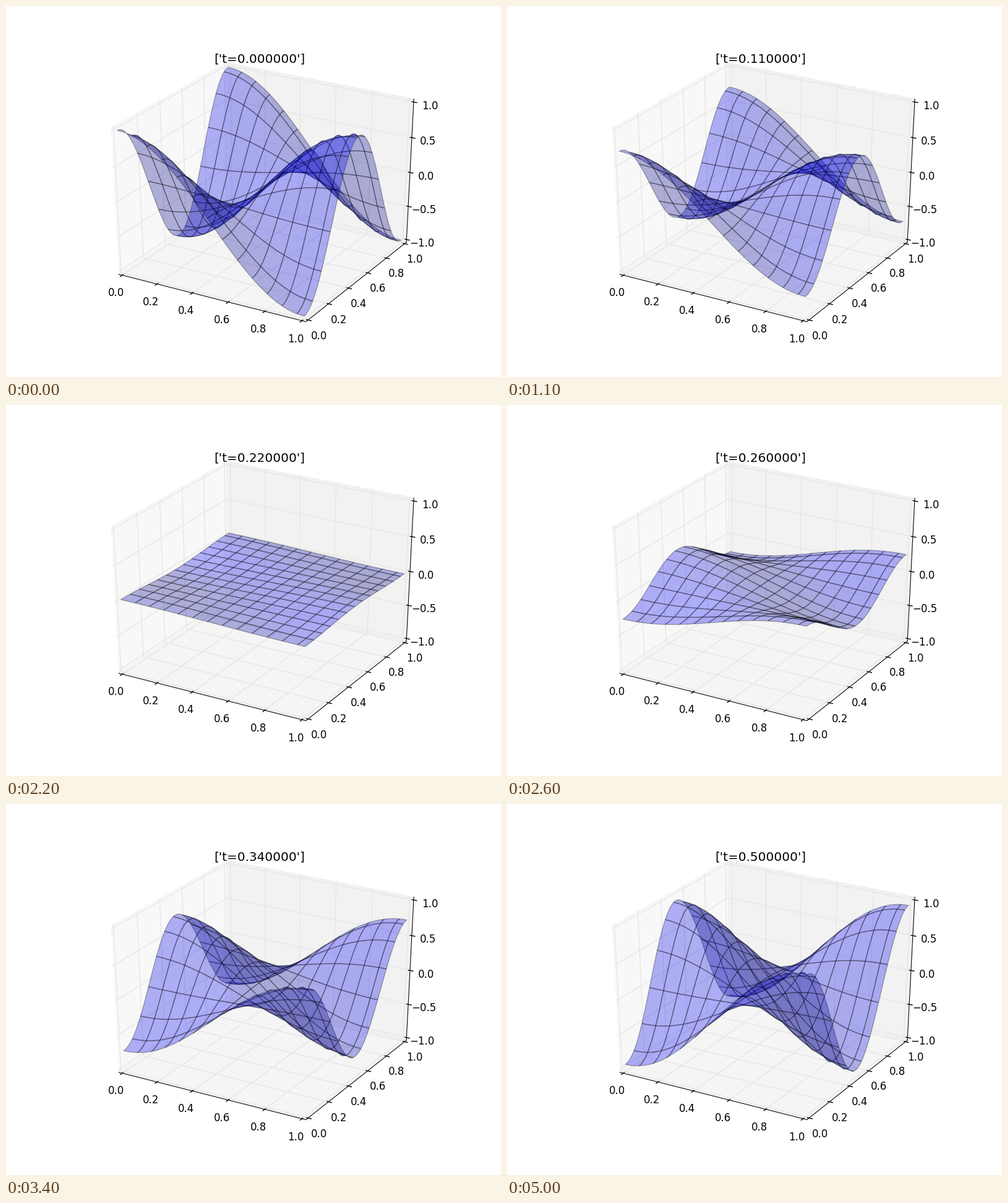
Animation, 800 px wide and 600 px high, one loop 5100 ms. Source, as a matplotlib script:

```python
import numpy as np
import matplotlib.pyplot as plt
from matplotlib.animation import FuncAnimation
from matplotlib.collections import LineCollection, PolyCollection
from matplotlib.patches import Polygon

plt.rcParams.update({
    "font.family": "DejaVu Sans",
    "font.size": 12,
    "text.kerning_factor": 6,
    "axes.unicode_minus": True,
})

FRAMES, INTERVAL = 51, 100
N, STRIDE = 101, 8
DIST = 10
ELEV, AZIM = np.radians(30), np.radians(-60)
ALPHA = 0.3

# Camera basis: right, up, and towards the viewer
RIGHT = np.array([-np.sin(AZIM), np.cos(AZIM), 0])
TOWARD = np.array([np.cos(AZIM) * np.cos(ELEV),
                   np.sin(AZIM) * np.cos(ELEV), np.sin(ELEV)])
UP = np.cross(TOWARD, RIGHT)

# The drawn box is slightly larger than the data range
DELTA = 1 / 12
LO, HI = -DELTA / 4, 1 + DELTA / 4


def project(points):
    """Perspective view of unit-cube points: 2D positions and depth."""
    p = np.asarray(points, float) - 0.5
    depth = DIST - p @ TOWARD
    xy = np.stack([p @ RIGHT, p @ UP], axis=-1) / depth[..., None]
    return xy, depth


def flat(points):
    return project(points)[0]


fig = plt.figure(figsize=(8, 6), dpi=100, facecolor="white")
ax = fig.add_axes([0.125, 0.1, 0.775, 0.8])
ax.set_xlim(-0.95 / DIST, 0.9 / DIST)
ax.set_ylim(-0.95 / DIST, 0.9 / DIST)
ax.set_axis_off()
title = ax.set_title("", y=0.92, pad=5, fontsize=14.4)


def draw_pane(corners, grey):
    ax.add_patch(Polygon(flat(corners), closed=False, facecolor=str(grey),
                         edgecolor=str(grey), alpha=0.5, linewidth=1,
                         zorder=0))


def draw_axis(index, edge, tick_dir, tick_sign, values, labels):
    """Grid, axis line, ticks and labels along one edge of the box."""
    ends = np.array([edge, edge], float)
    ends[:, index] = LO, HI

    back = np.array([LO, HI, LO])
    grid = []
    for v in values:
        path = np.array([back, back, back])
        path[:, index] = v
        for row, other in ((0, (index + 1) % 3), (2, (index + 2) % 3)):
            path[row, other] = LO + HI - back[other]
        grid.append(flat(path))
    ax.add_collection(LineCollection(grid, colors="0.9", linewidths=1,
                                     zorder=1), autolim=False)
    ax.plot(*flat(ends).T, color="black", lw=0.75, zorder=1)

    for v, label in zip(values, labels):
        tick = ends.copy()
        tick[:, index] = v
        tick[:, tick_dir] += tick_sign * DELTA * np.array([0.1, -0.2])
        ax.plot(*flat(tick).T, color="black", lw=1, zorder=1)

        spot = np.array(edge, float)
        spot += 0.7 * DELTA * np.where(spot < 0.5, -1, 1)
        spot[index] = v
        ax.text(*flat(spot), label, ha="center", va="top", zorder=1)


draw_pane([(LO, LO, LO), (LO, HI, LO), (LO, HI, HI), (LO, LO, HI)], 0.95)
draw_pane([(LO, HI, LO), (HI, HI, LO), (HI, HI, HI), (LO, HI, HI)], 0.9)
draw_pane([(LO, LO, LO), (HI, LO, LO), (HI, HI, LO), (LO, HI, LO)], 0.925)

fifths = np.linspace(0, 1, 6)
quarters = np.linspace(0, 1, 5)
flat_labels = [f"{v:.1f}" for v in fifths]
height_labels = [f"{2 * v - 1:.1f}".replace("-", "\u2212") for v in quarters]
draw_axis(0, (LO, LO, LO), 1, 1, fifths, flat_labels)
draw_axis(1, (HI, LO, LO), 0, -1, fifths, flat_labels)
draw_axis(2, (HI, HI, LO), 0, -1, quarters, height_labels)


def outline(r0, c0):
    """Grid indices around one patch of the surface."""
    r1, c1 = min(r0 + STRIDE, N - 1), min(c0 + STRIDE, N - 1)
    ring = [(r0, c) for c in range(c0, c1 + 1)]
    ring += [(r, c1) for r in range(r0 + 1, r1 + 1)]
    ring += [(r1, c) for c in range(c1 - 1, c0 - 1, -1)]
    ring += [(r, c0) for r in range(r1 - 1, r0 - 1, -1)]
    return tuple(np.array(ring).T)


starts = range(0, N - 1, STRIDE)
PATCHES = [outline(r, c) for r in starts for c in starts]
side = np.linspace(0, 1, N)
X, Y = np.meshgrid(side, side)
MODE = np.cos(np.pi * X) * np.cos(2 * np.pi * Y)
OMEGA = np.pi * np.sqrt(5)
LIGHT = np.array([-1, -1, 0.5])

surface = PolyCollection([], edgecolors=(0, 0, 0, ALPHA), linewidths=1,
                         zorder=2)
ax.add_collection(surface, autolim=False)


def brightness(ring):
    a, b, c = ring[0], ring[len(ring) // 3], ring[2 * len(ring) // 3]
    normal = np.cross(a - b, b - c)
    return normal @ LIGHT / np.linalg.norm(normal)


def update(i):
    t = i * 0.01
    Z = MODE * np.cos(OMEGA * t)
    points = np.stack([X, Y, Z], axis=-1)
    xy, depth = project(np.stack([X, Y, (Z + 1) / 2], axis=-1))

    shade = np.array([brightness(points[p]) for p in PATCHES])
    shade = (shade - shade.min()) / (shade.max() - shade.min())
    colors = np.zeros((len(PATCHES), 4))
    colors[:, 2] = 0.5 + 0.5 * shade
    colors[:, 3] = ALPHA

    # Farthest patches first
    nearness = np.array([np.mean(1 / depth[p]) for p in PATCHES])
    order = np.argsort(nearness, kind="stable")
    surface.set_verts([xy[PATCHES[k]] for k in order])
    surface.set_facecolor(colors[order])
    title.set_text(f"['t={t:f}']")
    return surface, title


anim = FuncAnimation(fig, update, frames=FRAMES, interval=INTERVAL,
                     repeat=True, repeat_delay=0, blit=False)
plt.show()
```
